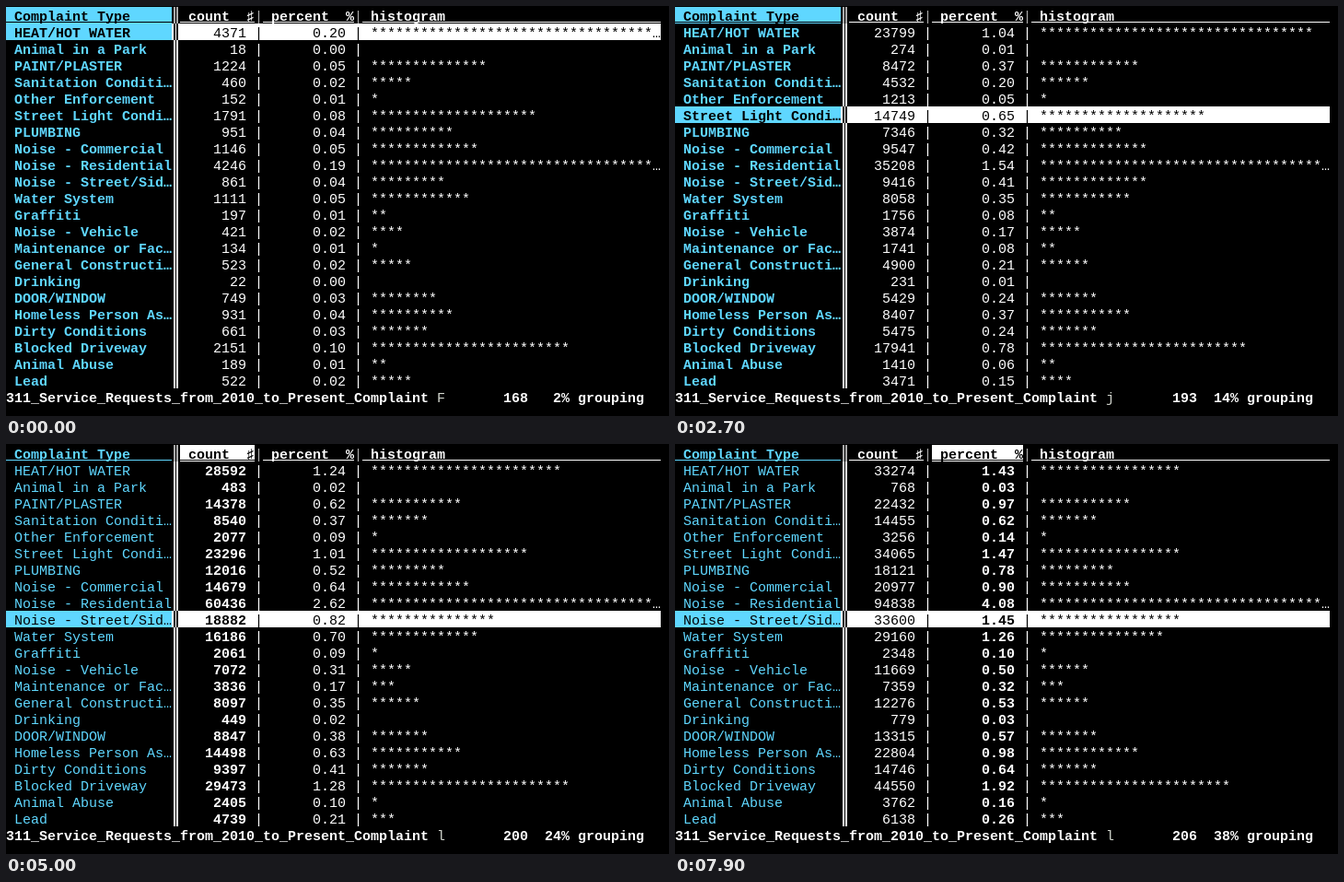
Write an HTML page with a canvas that moves like this. It is 720x445 px and loops after 8 s.

```html
<!DOCTYPE html>
<html lang="en">
<head>
<meta charset="utf-8">
<title>Frequency table</title>
<style>
  html, body { margin: 0; width: 100%; height: 100%; overflow: hidden; background: #000; }
  canvas { display: block; }
</style>
</head>
<body>
<canvas id="screen" width="720" height="445"></canvas>
<script>
const ctx = document.getElementById('screen').getContext('2d');
const CW = 9, CH = 18, TOP = 1, BASE = 15;
const CYAN = '#5fd7ff', WHITE = '#fff', BLACK = '#000', GREY = '#a8a8a8';
const END = 79; // last moment of the loop, in tenths of a second

// name, first count, last count, bend of the growth curve (below 1: fast at first)
const ROWS = [
  ['HEAT/HOT WATER', 4371, 33274, .37],
  ['Animal in a Park', 18, 768],
  ['PAINT/PLASTER', 1224, 22432],
  ['Sanitation Conditi…', 460, 14455, 1.15],
  ['Other Enforcement', 152, 3256],
  ['Street Light Condi…', 1791, 34065, .85],
  ['PLUMBING', 951, 18121, .92],
  ['Noise - Commercial', 1146, 20977, .8],
  ['Noise - Residential', 4246, 94838],
  ['Noise - Street/Sid…', 861, 33600, 1.25],
  ['Water System', 1111, 29160, 1.3],
  ['Graffiti', 197, 2348, .3],
  ['Noise - Vehicle', 421, 11669, 1.1],
  ['Maintenance or Fac…', 134, 7359, 1.4],
  ['General Constructi…', 523, 12276, .92],
  ['Drinking', 22, 779, 1.2],
  ['DOOR/WINDOW', 749, 13315, .92],
  ['Homeless Person As…', 931, 22804],
  ['Dirty Conditions', 661, 14746],
  ['Blocked Driveway', 2151, 44550, .92],
  ['Animal Abuse', 189, 3762],
  ['Lead', 522, 6138, .6],
];

const grow = (from, to, t, bend = 1) =>
  Math.round(from + (to - from) * (t / END) ** bend);

function fill(col, row, cols, color) {
  ctx.fillStyle = color;
  ctx.fillRect(col * CW, TOP + row * CH, cols * CW, CH);
}

function text(str, col, row, color, bold) {
  ctx.font = (bold ? 'bold ' : '') +
    '15px "Liberation Mono", "DejaVu Sans Mono", monospace';
  ctx.fillStyle = color;
  [...String(str)].forEach((ch, i) =>
    ctx.fillText(ch, (col + i) * CW, TOP + row * CH + BASE));
}

const textEnd = (str, end, row, color, bold) =>
  text(str, end - String(str).length, row, color, bold);

function separators(row, color) {
  ctx.fillStyle = color;
  for (const x of [182, 185]) ctx.fillRect(x, TOP + row * CH, 2, CH);
  text('|', 30, row, color);
  text('|', 42, row, color);
}

function header(current) {
  const cols = [['Complaint Type', '', 0, 20], ['count', '♯', 21, 9],
    ['percent', '%', 31, 11], ['histogram', '', 43, 36]];
  cols.forEach(([name, type, start, width], i) => {
    const base = i ? WHITE : CYAN, on = i === current;
    const ink = on ? BLACK : base;
    if (on) fill(start, 0, width, base);
    text(name, start + 1, 0, ink, true);
    textEnd(type, start + width, 0, ink, true);
    ctx.fillStyle = ink;
    ctx.fillRect(start * CW, 17, width * CW, 1);
  });
  separators(0, GREY);
}

function draw(t) {
  ctx.fillStyle = BLACK;
  ctx.fillRect(0, 0, 720, 445);

  // The cursor walks down nine rows, then right twice.
  const cursor = Math.max(0, Math.min(9, Math.floor((t - 13) / 2.65)));
  const current = t < 46 ? 0 : t < 51 ? 1 : 2;
  const key = cursor === 0 ? 'F' : current === 0 ? 'j' : 'l';
  header(current);

  // Counts refresh five times a second.
  const tick = t < 13 ? t - t % 2 : t - 1 + t % 2;
  const counts = ROWS.map(([, from, to, bend]) => grow(from, to, tick, bend));
  const most = Math.max(...counts);
  const total = grow(2235000, 2322000, tick, .5);

  ROWS.forEach(([name], i) => {
    const y = i + 1, on = i === cursor;
    const ink = on ? BLACK : WHITE;
    if (on) {
      fill(0, y, 20, CYAN);
      fill(20, y, 59, WHITE);
    }
    const stars = Math.floor(50 * counts[i] / most);
    text(name, 1, y, on ? BLACK : CYAN, current === 0);
    textEnd(counts[i], 29, y, ink, current === 1);
    textEnd((100 * counts[i] / total).toFixed(2), 41, y, ink, current === 2);
    text(stars > 35 ? '*'.repeat(34) + '…' : '*'.repeat(stars), 44, y, ink);
    separators(y, ink);
  });

  text('311_Service_Requests_from_2010_to_Present_Complaint', 0, 23, WHITE, true);
  text(key, 52, 23, '#d3d7cf');
  textEnd(grow(168, 206, tick, .38), 63, 23, WHITE, true);
  textEnd(grow(2, 38, tick) + '% grouping', 77, 23, WHITE, true);
}

let shown = -1;
function frame() {
  const t = Math.floor(performance.now() / 100) % (END + 1);
  if (t !== shown) draw(shown = t);
  requestAnimationFrame(frame);
}
frame();
</script>
</body>
</html>
```
